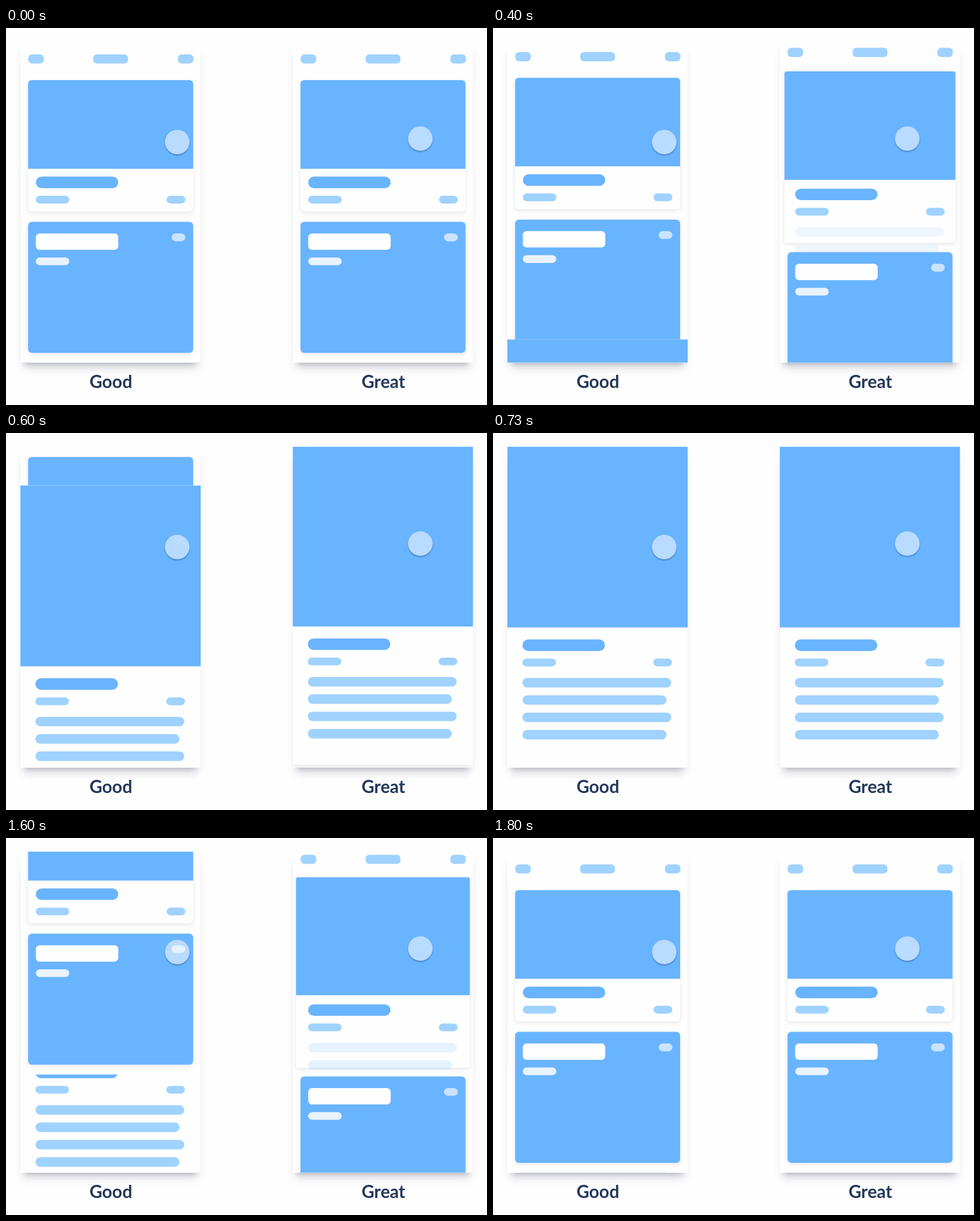
An HTML page that plays this animation: 766 by 600 pixels, repeating every 2460 ms.

```html
<!DOCTYPE html>
<html lang="en">
<head>
<meta charset="utf-8">
<title>Good and great transitions</title>
<style>
  html, body { margin: 0; width: 100%; height: 100%; overflow: hidden; background: #fefefe; }
  svg { display: block; width: 766px; height: 600px; }
  .page { fill: #fefefe; }
  .main { fill: #69b4ff; }
  .soft { fill: #9fd2ff; }
  .white { fill: #fefefe; }
  .raised { filter: drop-shadow(0 2px 3px rgba(50, 50, 93, .12)); }
  .ambient { fill: rgba(50, 50, 93, .2); filter: blur(6.75px); }
  .contact { fill: rgba(0, 0, 0, .28); filter: blur(4px); }
  .touch-shadow { fill: rgba(0, 30, 70, .4); filter: blur(1.2px); }
  .touch { fill: #fff; fill-opacity: .53; }
  text { font: 700 28px Lato, sans-serif; fill: #24385b; text-anchor: middle; }
</style>
</head>
<body>
<svg viewBox="0 0 766 600">
  <defs>
    <clipPath id="screen"><rect x="22.7" y="21.7" width="287.3" height="510.8"/></clipPath>
    <mask id="touch-rim" maskUnits="userSpaceOnUse" x="-30" y="-30" width="60" height="60">
      <rect x="-30" y="-30" width="60" height="60" fill="#fff"/>
      <circle r="19.5" fill="#000"/>
    </mask>

    <g id="phone-shadow">
      <rect class="ambient" x="27.7" y="39.7" width="277.3" height="500.8"/>
      <rect class="contact" x="30.7" y="37.7" width="271.3" height="494.8"/>
    </g>
    <rect id="sheet" class="page" x="22.7" y="21.7" width="287.3" height="511"/>

    <g id="header" class="soft">
      <rect x="35.4" y="42" width="24.8" height="14.6" rx="6"/>
      <rect x="138.8" y="42" width="55.6" height="14.6" rx="6"/>
      <rect x="273.8" y="42" width="24.8" height="14.6" rx="6"/>
    </g>

    <g id="meta">
      <rect class="main" x="47.5" y="236.5" width="131.3" height="18.4" rx="9.2"/>
      <rect class="soft" x="47.5" y="267" width="53.3" height="12.4" rx="6.2"/>
      <rect class="soft" x="255.8" y="267" width="29.8" height="12.4" rx="6.2"/>
    </g>

    <g id="lines" class="soft">
      <rect x="47.5" y="297.8" width="237" height="15.2" rx="7.6"/>
      <rect x="47.5" y="325.4" width="229.4" height="15.2" rx="7.6"/>
      <rect x="47.5" y="353" width="237" height="15.2" rx="7.6"/>
      <rect x="47.5" y="380.6" width="229.4" height="15.2" rx="7.6"/>
    </g>

    <g id="second-card">
      <rect class="main raised" x="35.2" y="308.6" width="262.8" height="208.4" rx="6"/>
      <rect class="white" x="47.5" y="327" width="131.3" height="26" rx="6"/>
      <rect class="white" x="263.8" y="327" width="21.8" height="12.4" rx="6.2" opacity=".65"/>
      <rect class="white" x="47.5" y="365.2" width="53.3" height="12.4" rx="6.2" opacity=".85"/>
    </g>

    <g id="touch">
      <circle class="touch-shadow" cy="1.6" r="19.5" mask="url(#touch-rim)"/>
      <circle class="touch" r="19.6"/>
    </g>
  </defs>

  <g>
    <use href="#phone-shadow"/>
    <use href="#sheet"/>
    <g clip-path="url(#screen)">
      <g id="list">
        <use href="#sheet"/>
        <use href="#header"/>
        <g class="card"><rect class="white raised"/><path class="main"/></g>
        <use href="#meta"/>
        <use href="#second-card"/>
      </g>
      <g id="detail">
        <use href="#sheet"/>
        <rect class="main" x="22.7" y="21.7" width="287.3" height="287.8"/>
        <g transform="translate(-.6 92)"><use href="#meta"/><use href="#lines"/></g>
      </g>
    </g>
    <use href="#touch" x="272.7" y="181.5"/>
    <text x="167" y="573">Good</text>
  </g>

  <g transform="translate(433.8 0)">
    <use href="#phone-shadow"/>
    <use href="#sheet"/>
    <g clip-path="url(#screen)">
      <use id="top-bar" href="#header"/>
      <g class="card"><rect class="white raised"/><path class="main"/></g>
      <g id="copy"><use href="#meta"/><use id="body-lines" href="#lines"/></g>
      <use id="next-card" href="#second-card"/>
    </g>
    <use href="#touch" x="226" y="176"/>
    <text x="167.2" y="573">Great</text>
  </g>
</svg>

<script>
  const LOOP = 2460, FRAME = 1000 / 15, SCREEN = 511, PARALLAX = 51;
  const $ = id => document.getElementById(id);
  const [listCard, openingCard] = document.querySelectorAll('.card');
  const list = $('list'), detail = $('detail');

  const clamp = v => Math.min(1, Math.max(0, v));
  const mix = (a, b, p) => a + (b - a) * p;
  const move = (el, x, y) => el.setAttribute('transform', `translate(${x} ${y})`);

  // Timed cubic-bezier with control points (x1, 0) and (x2, 1).
  function tween(start, duration, x1, x2) {
    return time => {
      const u = clamp((time - start) / duration);
      if (u === 0 || u === 1) return u;
      let low = 0, high = 1, s;
      for (let i = 0; i < 24; i++) {
        s = (low + high) / 2;
        const r = 1 - s;
        const x = 3 * r * r * s * x1 + 3 * r * s * s * x2 + s ** 3;
        if (x < u) low = s; else high = s;
      }
      return s * s * (3 - 2 * s);
    };
  }

  const push = tween(330, 403, .42, .36);
  const expand = tween(250, 410, .65, .3);
  const back = tween(1400, 385, .42, .36);

  function drawCard(card, open) {
    const widen = clamp(open * 1.86), rise = clamp(open * 1.09);
    const x = mix(35.2, 22.7, widen), width = mix(262.8, 287.3, widen);
    const y = mix(83, 21.7, rise), split = mix(224, 309.5, open);
    const bottom = mix(292, 532.5, open), r = mix(6, 0, widen);
    const [body, hero] = card.children;
    const box = { x, y, width, height: bottom - y, rx: r };
    for (const name in box) body.setAttribute(name, box[name]);
    hero.setAttribute('d', `M${x} ${split}V${y + r}q0 ${-r} ${r} ${-r}` +
      `h${width - 2 * r}q${r} 0 ${r} ${r}V${split}z`);
  }

  function drawGood(time) {
    const returning = time >= 1400;
    const p = returning ? back(time) : push(time);
    move(list, 0, returning ? -SCREEN * (1 - p) : -PARALLAX * p);
    move(detail, 0, returning ? PARALLAX * p : SCREEN * (1 - p));
    const front = returning ? list : detail;
    if (front.nextElementSibling) front.parentNode.append(front);
  }

  function drawGreat(time) {
    const open = time >= 1400 ? 1 - back(time) : expand(time);
    drawCard(openingCard, open);
    move($('top-bar'), 0, -50 * open);
    move($('copy'), -.6 * open, 92 * open);
    move($('next-card'), 0, 232 * open);
    $('body-lines').setAttribute('opacity', open ** 1.2);
  }

  function draw() {
    const now = performance.now() % LOOP;
    const time = Math.floor((now + 7) / FRAME) * FRAME;
    drawGood(time);
    drawGreat(time);
    requestAnimationFrame(draw);
  }

  drawCard(listCard, 0);
  draw();
</script>
</body>
</html>
```
